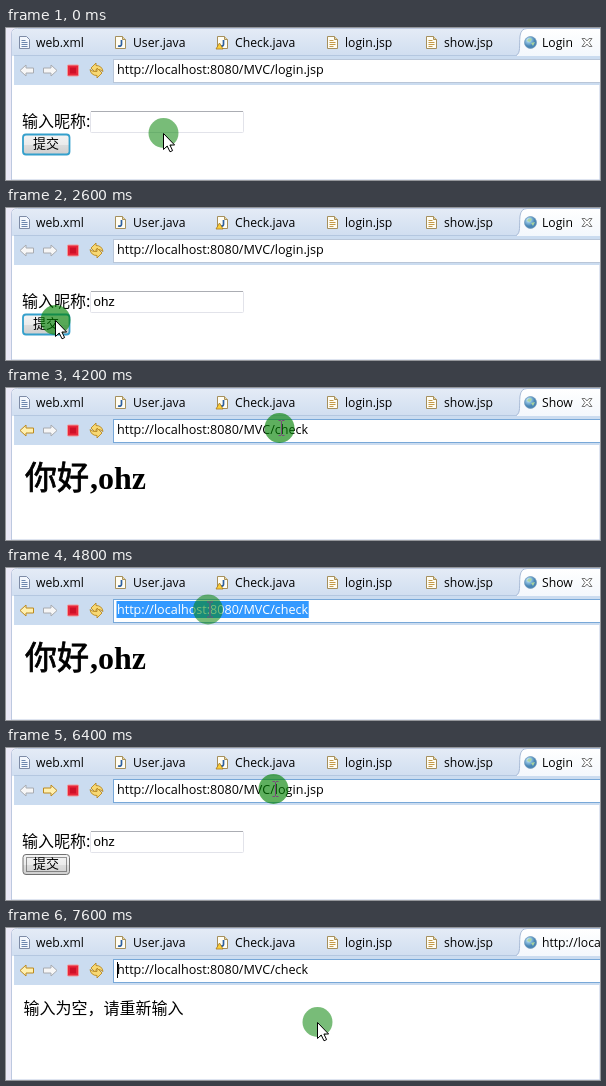
These frames come from a looping animation (594x152 px, 8 s). An HTML page:

```html
<!DOCTYPE html>
<html lang="zh">
<head>
<meta charset="utf-8">
<style>
  html, body { margin: 0; width: 100%; height: 100%; overflow: hidden; background: #fff; }
  svg { display: block; width: 594px; height: 152px; }
  text { white-space: pre; fill: #000; }
  .ui { font: 12.2px "Open Sans", sans-serif; }
  .url { font: 12.6px "Open Sans", sans-serif; }
  .cjk { font: 16px "Noto Sans CJK SC", "Noto Sans CJK", sans-serif; }
  .field { font: 13.33px "Liberation Sans", Arial, sans-serif; }
  .head { font: bold 32px "Liberation Serif", serif; }
  .big { font: 32px "Noto Sans CJK SC", "Noto Sans CJK", sans-serif; stroke: #000; stroke-width: .8px; }
  .small { font-size: 13px; }
</style>
</head>
<body>
<svg viewBox="0 0 594 152" xmlns="http://www.w3.org/2000/svg">
  <defs>
    <linearGradient id="bar" x2="0" y2="1"><stop stop-color="#e4ebf6"/><stop offset="1" stop-color="#d0def0"/></linearGradient>
    <linearGradient id="active" x2="0" y2="1"><stop stop-color="#fff"/><stop offset="1" stop-color="#f3f7fc"/></linearGradient>
    <linearGradient id="button" x2="0" y2="1"><stop stop-color="#f4f4f4"/><stop offset=".5" stop-color="#ebebeb"/><stop offset=".5" stop-color="#dddddd"/><stop offset="1" stop-color="#cfcfcf"/></linearGradient>
    <radialGradient id="globe" cx=".35" cy=".3"><stop stop-color="#e6f5fc"/><stop offset=".5" stop-color="#84b9dc"/><stop offset="1" stop-color="#4a86b4"/></radialGradient>
    <path id="arrow" d="M1 6.5 7 1v3h7.500v5H7v3z" stroke-linejoin="round"/>
    <path id="turn" d="M85 40l5-5v2.500q6 0 7 6-2.500-2.500-7-2v3.500z" fill="#f7d873" stroke="#b98a22" stroke-width=".9"/>
    <g id="doc"><path d="M.5.5h7l3 3v9H.5z" fill="#fffdf3" stroke="#a58f5c"/><path d="M7.500.5v3h3" fill="#ecd9a0" stroke="#a58f5c"/></g>
  </defs>

  <rect width="594" height="152" fill="#ebe9f7"/>
  <path d="M5.500 152V6q0-5.500 6-5.500H594V152z" fill="#fff" stroke="#bdc9e0"/>
  <path d="M6 28V6q0-5 6-5H594V28z" fill="url(#bar)"/>
  <path d="M8 27.500H514" stroke="#b4c7e0"/>
  <rect x="8" y="28" width="586" height="29" fill="#cbdcf0"/>
  <path d="M510 28C515 25 513 18 514 8Q515 1 521 1H594V28z" fill="url(#active)"/>
  <path d="M510 27.500C515 25 513 18 514 8Q515 .5 521 .5H594" fill="none" stroke="#a9bbd6"/>

  <g id="tabs"></g>
  <circle cx="524.500" cy="14.500" r="6" fill="url(#globe)" stroke="#6d97b8" stroke-width=".7"/>
  <path d="M521 13q2-4 5-2l-2 3zm4 2 4-1-2 4z" fill="#a9d3a0"/>
  <text id="title" class="ui" x="536" y="19"></text>
  <path id="close" d="M576 10.500h3l2 2.500 2-2.500h3l-3 4 3 4h-3l-2-2.500-2 2.500h-3l3-4z" fill="#fff" stroke="#747474"/>

  <use id="back" href="#arrow" x="13" y="36"/>
  <use id="forward" href="#arrow" transform="translate(52 36) scale(-1 1)"/>
  <rect x="61.500" y="37" width="11" height="11" rx="1" fill="#e8273b" stroke="#f19a9a"/>
  <path d="M64 39.500h6v6h-6z" fill="#cf1027"/>
  <use href="#turn"/>
  <use href="#turn" transform="rotate(180 90.500 42.500)"/>
  <rect id="urlBox" x="107.500" y="31.500" width="490" height="23" fill="#fff"/>
  <rect id="mark" y="33" height="17" fill="#39f"/>
  <text id="url" class="url" x="111" y="46"></text>

  <g id="form">
    <text class="cjk" x="16" y="99">输入昵称:</text>
    <rect id="box" x="84.500" y="83.500" width="153" height="21" rx="1" fill="#fff"/>
    <path id="boxTop" d="M85 83.500h152"/>
    <text id="name" class="field" x="87.500" y="98"></text>
    <rect id="btn" x="17" y="106.500" width="46.500" height="20" rx="3" fill="url(#button)"/>
    <rect id="dots" x="20.500" y="109.500" width="40" height="14" fill="none" stroke="#333" stroke-dasharray="1 1"/>
    <text class="cjk small" x="27" y="120">提交</text>
  </g>
  <g id="hello">
    <text class="big" x="19" y="101">你好</text>
    <text class="head" x="84" y="101">,ohz</text>
  </g>
  <text id="empty" class="cjk" x="17.500" y="86">输入为空，请重新输入</text>
  <rect id="caret" width="1" height="16"/>

  <g id="pointer">
    <circle id="halo" cx=".5" r="15" fill="#008000"/>
    <circle id="ring" r="14.500" fill="none" stroke="#f00000" stroke-width="2.500" stroke-dasharray="5 .7"/>
    <path id="tip" d="M.5.5v16l3.700-3.500 2.800 5.800 2.600-1.200-2.700-5.600h4.700z" fill="#fff" stroke="#000"/>
    <path id="beam" d="M-.5-7.500h2.500m1 0h2.500M2.500-7v14M-.5 7.500h2.500m1 0h2.500" fill="none" stroke="#7a4a7a"/>
  </g>
</svg>
<script>
const LOOP = 8000, STEP = 200, NAME = 'ohz';
const BASE = 'http://localhost:8080/MVC/';
const el = Object.fromEntries([...document.querySelectorAll('svg [id]')].map(e => [e.id, e]));

const set = (e, attrs) => { for (const k in attrs) e.setAttribute(k, attrs[k]); };
const show = (e, on) => e.setAttribute('visibility', on ? 'inherit' : 'hidden');
const latest = (track, t) => track.filter(k => k[0] <= t).pop()[1];
const within = (t, from, to) => t >= from && t < to;

// Editor tabs: icon x, label x, label, kind
const tabs = [[13, 30, 'web.xml', 'xml'], [109, 127, 'User.java', 'java'], [211, 229, 'Check.java', 'warn'],
  [321, 339, 'login.jsp', 'jsp'], [420, 438, 'show.jsp', 'jsp']];
const glyph = {
  xml: '<path d="M.5.5h7l3 3v9H.5z" fill="#f3f7fd" stroke="#7d8ba6"/><path d="M2.500 4.500h4m-4 2h6m-6 2h6m-6 2h6" stroke="#6d86ad"/>',
  java: '<use href="#doc"/><path d="M6.500 4v4.500q0 2-3.500 1.500" fill="none" stroke="#2d5fa0" stroke-width="1.700"/>',
  jsp: '<use href="#doc"/><path d="M2.500 4.500h4m-4 2h6m-6 2h6m-6 2h4" stroke="#c49a48"/>'
};
glyph.warn = glyph.java + '<path d="M-1 13l3.500-6L6 13z" fill="#f9cf3c" stroke="#a9791c" stroke-width=".8"/>';
el.tabs.innerHTML = tabs.map(([icon, x, label, kind]) =>
  `<g transform="translate(${icon} 8)">${glyph[kind]}</g><text class="ui" x="${x}" y="19">${label}</text>`).join('');

const pages = [[0, 'form'], [2800, 'hello'], [5800, 'form'], [7400, 'empty']];
const titles = [[0, 'Login'], [2800, 'Show'], [5800, 'Login'], [7400, 'http://localhost']];
const paths = [[0, 'login.jsp'], [2800, 'check'], [5800, 'login.jsp'], [6800, 'c'], [7000, 'che'], [7200, 'check']];
const typed = [[0, 0], [1200, 1], [1400, 2], [1800, 3]];
const presses = [[800, 1000], [2600, 2800], [3800, 4000], [4200, 4600], [5400, 5800], [6400, 6600]];
const route = [[0, 157, 105], [600, 139.5, 93.5], [1800, 139.5, 93.5], [2400, 49, 112], [2800, 49, 112],
  [3000, 60, 115], [3200, 126, 100], [3800, 273, 40], [4600, 273, 40], [5000, 130, 43], [5200, 18.5, 38.5],
  [5800, 18.5, 38.5], [6400, 267, 41], [7200, 267, 41], [7600, 311, 94], [LOOP, 311, 94]];

function position(t) {
  const i = route.findIndex(k => k[0] > t);
  const [t0, x0, y0] = route[i - 1], [t1, x1, y1] = route[i];
  const f = (t - t0) / (t1 - t0);
  return [x0 + (x1 - x0) * f, y0 + (y1 - y0) * f];
}

function paintArrow(arrow, on) {
  set(arrow, on ? { fill: '#fff0b0', stroke: '#bd8a1e' } : { fill: '#f6f6f6', stroke: '#a8abb0' });
}

function placeCaret(x, y) {
  set(el.caret, { x: Math.round(x), y });
}

function paint(t) {
  const page = latest(pages, t);
  for (const id of ['form', 'hello', 'empty']) show(el[id], id === page);
  el.title.textContent = latest(titles, t);
  show(el.close, page !== 'empty');
  paintArrow(el.back, page !== 'form');
  paintArrow(el.forward, within(t, 5800, 7400));

  // Address bar
  const all = within(t, 4600, 5800), part = within(t, 6600, 6800);
  const file = latest(paths, t);
  el.url.textContent = BASE;
  const stem = el.url.getComputedTextLength();
  el.url.innerHTML = `${BASE}<tspan>${file}</tspan>`;
  const full = el.url.getComputedTextLength();
  el.url.style.fill = all ? '#fff' : '#000';
  el.url.lastChild.style.fill = all || part ? '#fff' : '#000';
  set(el.mark, { x: part ? 111 + stem : 110.5, width: part ? full - stem : full + 1 });
  show(el.mark, all || part);
  set(el.urlBox, { stroke: t >= 4000 ? '#78a8d8' : '#b9c6d8' });

  // Form
  const boxFocus = within(t, 1000, 2600), again = t >= 5800;
  el.name.textContent = NAME.slice(0, latest(typed, t));
  set(el.box, { stroke: boxFocus ? '#b5cfe7' : '#e2e3ea' });
  set(el.boxTop, { stroke: boxFocus ? '#6f9fc4' : '#abadb3' });
  set(el.btn, { stroke: again ? '#707070' : '#35a0cc', 'stroke-width': again ? 1 : 1.8 });
  show(el.dots, again);

  // Text caret
  show(el.caret, boxFocus || t >= 6800);
  if (boxFocus) placeCaret(87.5 + el.name.getComputedTextLength(), 86);
  else placeCaret(111 + (page === 'empty' ? 0 : full), 34);

  // Mouse pointer
  const [x, y] = position(t);
  const overUrl = x > 107 && y > 31 && y < 55;
  const overBox = page === 'form' && x > 84 && x < 238 && y > 83 && y < 98;
  const overBack = x < 30 && y < 55;
  set(el.pointer, { transform: `translate(${x} ${y})` });
  set(el.halo, { opacity: presses.some(p => within(t, ...p)) ? 0.63 : 0.53 });
  show(el.ring, within(t, 5600, 5800));
  show(el.beam, overUrl || overBox);
  show(el.tip, !overUrl && !overBox && !overBack);
}

let shown = -1;
const start = performance.now();
function tick() {
  const now = Math.max(0, performance.now() - start) % LOOP;
  const t = Math.floor(now / STEP) * STEP;
  if (t !== shown) paint(shown = t);
  requestAnimationFrame(tick);
}
tick();
</script>
</body>
</html>
```
